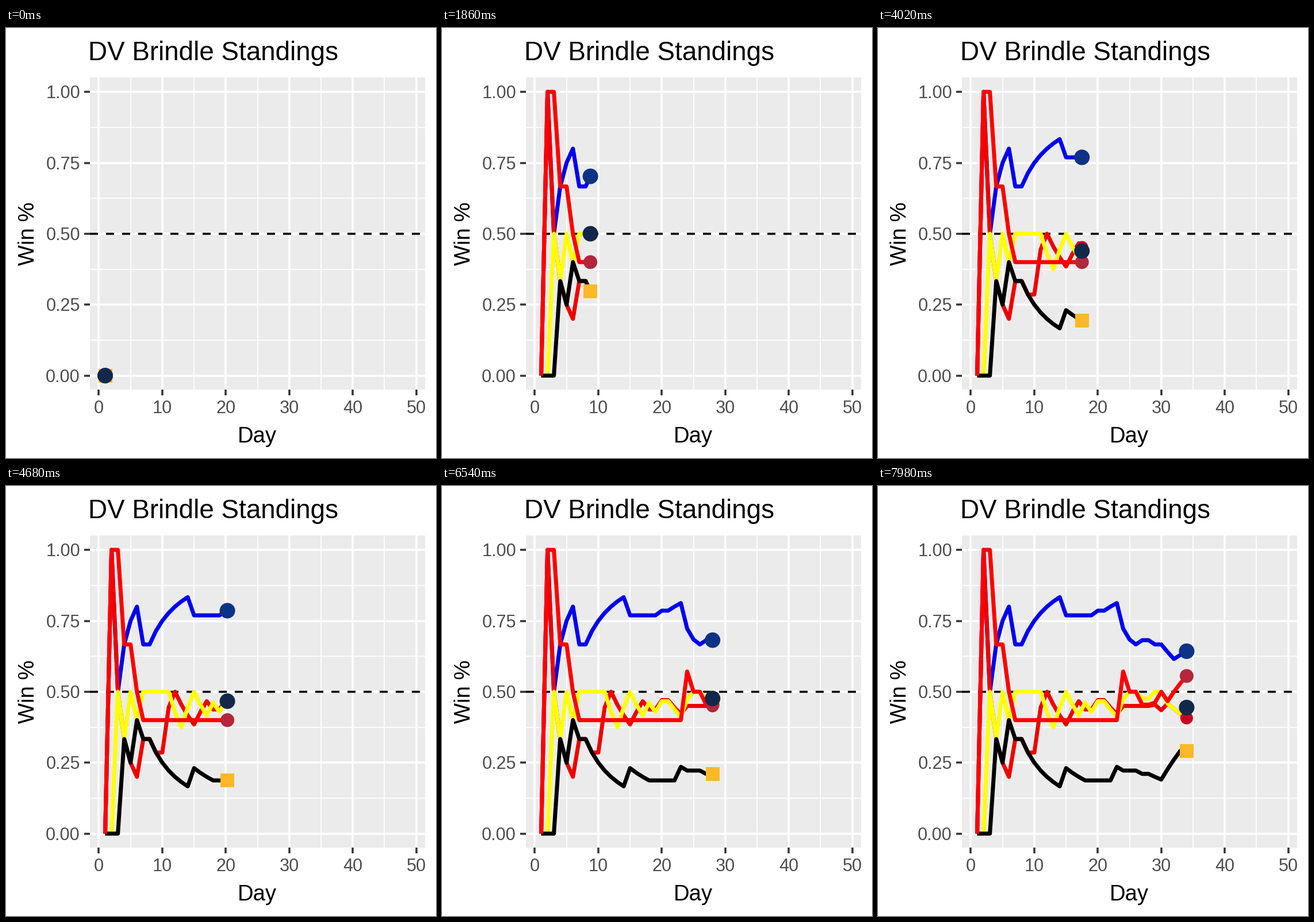
Write a matplotlib script that moves like this. It is 748 by 748 pixels and loops after 8 s.

```python
import numpy as np
import matplotlib
import matplotlib.pyplot as plt
from matplotlib.animation import FuncAnimation
from matplotlib.patches import Circle, Rectangle

matplotlib.rcParams["font.family"] = "Liberation Sans"

SIZE, DPI = 748, 100
PT = 72 / DPI                       # points per pixel
LEFT, TOP, RIGHT, BOTTOM = 146, 86, 729, 629


def px(day):
    return 161.5 + 11.042 * day


def py(pct):
    return 604.7 - 493.6 * pct


# Winning percentage after each day, starting with day 1
BLUE = ([0, 1, 1/2, 2/3, 3/4, 4/5, 2/3, 2/3, 5/7, 6/8, 7/9, 8/10, 9/11, 10/12]
        + [10/13] * 5
        + [11/14, 11/14, 12/15, 13/16, 13/18, 13/19, 14/21, 15/22, 15/22,
           2/3, 2/3, 16/25, 16/26, 17/27, 18/28])
CRIMSON = ([0, 1, 1/2, 1/3, 1/4, 1/5, 1/3, 1/3, 2/7, 2/7, 4/9, 5/10, 5/11,
            5/12, 5/13, 6/14, 7/15, 7/16, 7/16, 8/17, 8/17, 8/18, 8/19]
           + [9/20] * 5
           + [10/22, 10/23, 11/24, 11/25, 11/26, 11/27])
YELLOW = ([0, 0, 1/2, 1/3, 1/2, 2/5] + [1/2] * 5
          + [3/7, 3/8, 4/9, 5/10, 5/11, 5/12, 6/13, 6/14, 7/15, 7/15, 7/16,
             7/17, 9/19, 1/2, 1/2, 10/21, 10/21, 1/2, 1/2, 11/24, 11/25,
             11/26, 12/27])
BLACK = ([0, 0, 0, 1/3, 1/4, 2/5, 1/3, 1/3, 2/7, 2/8, 2/9, 2/10, 2/11, 2/12,
          3/13, 3/14, 3/15]
         + [3/16] * 5
         + [4/17, 4/18, 4/18, 4/18, 4/19, 4/19, 4/20, 4/21, 5/22, 6/23,
            7/24, 7/24])
RED = ([0, 1, 1, 2/3, 2/3, 1/2] + [2/5] * 17
       + [4/7, 1/2, 1/2, 5/11, 5/11, 6/13, 7/14, 7/15, 8/16, 9/17, 10/18])

DAYS = np.arange(1, 35)

fig = plt.figure(figsize=(SIZE / DPI, SIZE / DPI), dpi=DPI, facecolor="white")
ax = fig.add_axes([0, 0, 1, 1])
ax.set_xlim(0, SIZE)
ax.set_ylim(SIZE, 0)
ax.axis("off")


def rule(x0, y0, x1, y1, color, width, z, **kw):
    ax.plot([x0, x1], [y0, y1], color=color, lw=width * PT, zorder=z,
            solid_capstyle="butt", dash_capstyle="butt", **kw)


def label(x, y, text, size, color="black", **kw):
    ax.text(x, y, text, fontsize=size * PT, color=color, va="baseline", **kw)


ax.add_patch(Rectangle((LEFT, TOP), RIGHT - LEFT, BOTTOM - TOP,
                       fc="#ebebeb", lw=0, zorder=0))

for day in range(5, 50, 10):
    rule(px(day), TOP, px(day), BOTTOM, "white", 1.8, 1)
for pct in (0.125, 0.375, 0.625, 0.875):
    rule(LEFT, py(pct), RIGHT, py(pct), "white", 1.8, 1)

for day in range(0, 51, 10):
    x = px(day)
    rule(x, TOP, x, BOTTOM, "white", 3.5, 2)
    rule(x, BOTTOM, x, BOTTOM + 9.5, "#333333", 3.5, 2)
    label(x, 670, str(day), 30.6, "#4d4d4d", ha="center")
for pct in (0, 0.25, 0.5, 0.75, 1):
    y = py(pct)
    rule(LEFT, y, RIGHT, y, "white", 3.5, 2)
    rule(LEFT - 9.5, y, LEFT, y, "#333333", 3.5, 2)
    label(129, y + 11, f"{pct:.2f}", 30.6, "#4d4d4d", ha="right")

rule(LEFT, py(0.5), RIGHT, py(0.5), "black", 3.5, 3, linestyle=(0, (4, 4)))

label(143.5, 55.5, "DV Brindle Standings", 45.8, ha="left")
label(437.3, 721, "Day", 38.2, ha="center")
ax.text(49, 358, "Win %", fontsize=38.2 * PT, rotation=90,
        rotation_mode="anchor", ha="center", va="baseline")


def disc(radius, color, z):
    return ax.add_patch(Circle((0, 0), radius, fc=color, lw=0, zorder=z))


def block(side, color, z):
    return ax.add_patch(Rectangle((0, 0), side, side, fc=color, lw=0, zorder=z))


# values, line colour, marker
TEAMS = [
    (BLUE, "#0000ee", disc(13.5, "#0e3386", 20)),
    (CRIMSON, "#ee0000", disc(11, "#c6011f", 21)),
    (YELLOW, "#ffff00", disc(13.5, "#12284b", 24)),
    (BLACK, "#000000", block(24, "#fdb827", 23)),
    (RED, "#ff0000", disc(12, "#b3263c", 22)),
]
lines = [ax.plot([], [], color=color, lw=7 * PT, zorder=10 + i,
                 solid_capstyle="butt", solid_joinstyle="round")[0]
         for i, (_, color, _) in enumerate(TEAMS)]


def place(marker, x, y):
    if isinstance(marker, Circle):
        marker.center = (x, y)
    else:
        half = marker.get_width() / 2
        marker.set_xy((x - half, y - half))


def update(i):
    # A new picture every 60 ms, four per day except for one longer day
    now = np.interp(i // 3, [0, 48, 53, 133], [1, 13, 14, 34])
    past = DAYS[DAYS < now]
    days = np.append(past, now)
    for (values, _, marker), line in zip(TEAMS, lines):
        pcts = np.interp(days, DAYS, values)
        line.set_data(px(days), py(pcts))
        place(marker, px(now), py(pcts[-1]))
    return lines + [team[2] for team in TEAMS]


anim = FuncAnimation(fig, update, frames=400, interval=20, repeat=True,
                     repeat_delay=0, blit=False)
plt.show()
```
